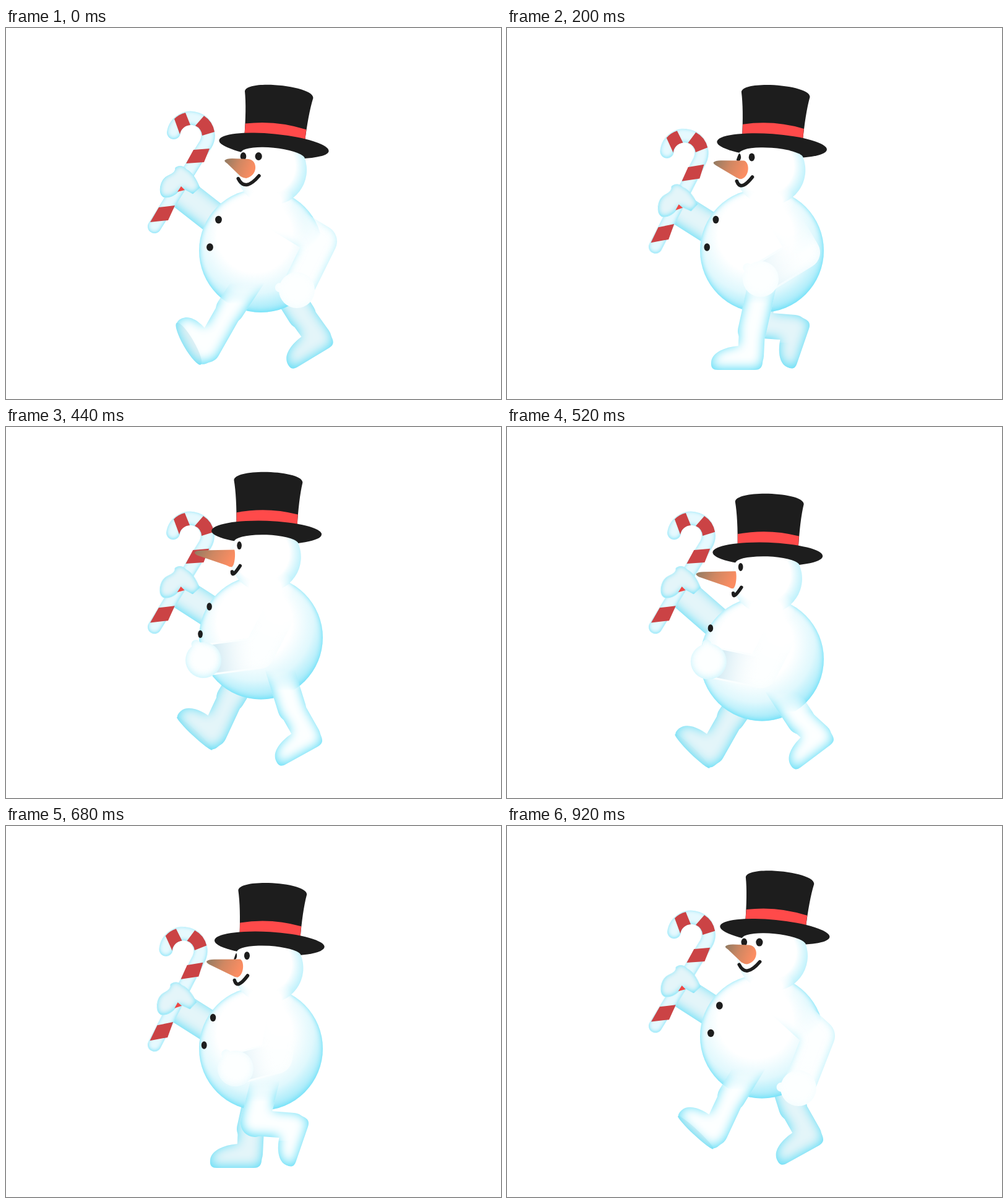
Recreate the animation shown at these times as an HTML page. Size 800 by 600 pixels, loop 960 ms.

```html
<!DOCTYPE html>
<html lang="en">
<head>
<meta charset="utf-8">
<title>Walking snowman</title>
<style>
html, body { margin: 0; width: 100%; height: 100%; overflow: hidden; background: #fff; }
svg { display: block; width: 800px; height: 600px; }
.limb { fill: none; stroke-linecap: round; stroke-linejoin: round; }
.near { stroke: #fdffff; fill: #fdffff; }
.far { stroke: #e4f5f9; fill: #e4f5f9; }
.foot, .sole { stroke: none; }
.sole { fill: #e0f1f5; }
.red { fill: #cb4345; }
.ink { fill: #1d1d1d; }
</style>
</head>
<body>
<svg viewBox="0 0 800 600">
  <defs>
    <g id="filters"></g>
    <radialGradient id="snow" gradientUnits="userSpaceOnUse" cx="402" cy="335" r="126">
      <stop offset=".48" stop-color="#fff"/>
      <stop offset=".75" stop-color="#e0f8fd"/>
      <stop offset="1" stop-color="#9ce9fa"/>
    </radialGradient>
    <radialGradient id="headSnow" gradientUnits="userSpaceOnUse" cx="-7" cy="34" r="70">
      <stop offset=".64" stop-color="#fff"/>
      <stop offset="1" stop-color="#b0eefb"/>
    </radialGradient>
    <radialGradient id="neckSnow">
      <stop offset=".55" stop-color="#fff"/>
      <stop offset="1" stop-color="#fff" stop-opacity="0"/>
    </radialGradient>
    <linearGradient id="carrot" x2="1" y2=".25">
      <stop offset="0" stop-color="#8f7a62"/>
      <stop offset=".5" stop-color="#d08762"/>
      <stop offset="1" stop-color="#fb8d62"/>
    </linearGradient>
    <linearGradient id="sleeve" gradientUnits="userSpaceOnUse">
      <stop offset=".25" stop-color="#d6ecf4"/>
      <stop offset="1" stop-color="#fff" stop-opacity="0"/>
    </linearGradient>
    <linearGradient id="legFade" gradientUnits="userSpaceOnUse" x1="0" y1="412" x2="0" y2="446">
      <stop offset="0" stop-color="#000"/>
      <stop offset="1" stop-color="#fff"/>
    </linearGradient>
    <radialGradient id="armFade" gradientUnits="userSpaceOnUse" cx="446" cy="300" r="72">
      <stop offset=".4" stop-color="#000"/>
      <stop offset="1" stop-color="#fff"/>
    </radialGradient>
    <mask id="legMask" maskUnits="userSpaceOnUse" x="200" y="0" width="400" height="600">
      <rect class="bob" x="200" y="-60" width="400" height="720" fill="url(#legFade)"/>
    </mask>
    <mask id="armMask" maskUnits="userSpaceOnUse" x="200" y="0" width="400" height="600">
      <rect class="bob" x="200" y="-60" width="400" height="720" fill="url(#armFade)"/>
    </mask>
    <path id="skull" d="M-51,14A52,13 0 0 1 51,14A57,57 0 1 1 -51,14Z"/>
    <clipPath id="faceClip"><use class="tilt" href="#skull"/></clipPath>
  </defs>

  <g filter="url(#glow)"><path id="farArm" class="limb far" style="fill:none" stroke-width="51"/></g>

  <g id="cane">
    <g filter="url(#tube)">
      <path class="limb" stroke="#e6f9fe" stroke-width="22" d="M240,321L322.8,187.8A28,28 0 1 0 271,169"/>
    </g>
    <path class="red" d="M247,290L273,287L262,311L233,314Z"/>
    <path class="red" d="M303,197L329,195L320,217L291,219Z"/>
    <path class="red" d="M320,142A38,38 0 0 1 337,168L317,174A18,18 0 0 0 306,158Z"/>
    <path class="red" d="M272,147A38,38 0 0 1 290,137L298,157A18,18 0 0 0 281,172Z"/>
    <g filter="url(#rim)">
      <path class="far" stroke="none" d="M274,226C281,221 288,224 292,229C302,234 308,246 313,258L302,268L284,258C276,270 264,276 254,273C246,268 249,249 257,242C263,237 274,236 274,226Z"/>
    </g>
    <path fill="#ee4744" d="M283,256L289,262L277,265Z"/>
  </g>

  <g id="farLeg" class="far" filter="url(#glow)"></g>

  <g class="bob">
    <circle cx="412" cy="360" r="100" fill="url(#snow)" filter="url(#rim)"/>
    <ellipse id="button1" class="ink" cy="310" ry="6.2"/>
    <ellipse id="button2" class="ink" cy="354.5" ry="6.2"/>
  </g>

  <g mask="url(#legMask)"><g id="nearLeg" class="near" filter="url(#glow)"></g></g>

  <g mask="url(#armMask)">
    <g filter="url(#armGlow)"><path id="arm" class="limb near" style="fill:none" stroke-width="52"/></g>
    <path id="forearm" class="limb" stroke="url(#sleeve)" stroke-width="46" style="stroke-linecap:butt"/>
  </g>
  <g class="near" filter="url(#handGlow)">
    <circle id="hand" r="29" stroke="none"/>
    <path id="thumb" class="limb" stroke-width="15"/>
  </g>

  <g class="bob">
    <g class="tilt">
      <path class="ink" d="M-55.5,-83C-55,-103 55,-103 55.5,-83Q50,-56 49,-8L-49,-8Q-50,-56 -55.5,-83Z"/>
      <path fill="#ff4a4a" d="M-49.5,-31Q0,-42 49.5,-31L49,-10L-49,-10Z"/>
      <ellipse class="ink" rx="89" ry="19"/>
      <use href="#skull" fill="url(#headSnow)"/>
    </g>
    <ellipse cx="419" cy="280" rx="47" ry="34" fill="url(#neckSnow)"/>
    <g clip-path="url(#faceClip)">
      <ellipse id="eye1" class="ink" ry="6.5"/>
      <ellipse id="eye2" class="ink" ry="6.5"/>
    </g>
    <path id="mouth" class="limb" stroke="#1d1d1d" stroke-width="5.5"/>
    <path id="nose" fill="url(#carrot)"/>
  </g>
</svg>
<script>
const LOOP = 960, HALF = 480, STEP = 40;
const $ = id => document.getElementById(id);
const set = (el, attrs) => { for (const k in attrs) el.setAttribute(k, attrs[k]); };

// Inner glow: colour seeps in from the edge of the shape
const innerGlow = (id, blur, dy, color) => `
  <filter id="${id}" filterUnits="userSpaceOnUse" x="-100" y="-60" width="700" height="660" color-interpolation-filters="sRGB">
    <feGaussianBlur in="SourceAlpha" stdDeviation="${blur}"/>
    <feOffset dy="${dy}" result="core"/>
    <feFlood id="${id}Flood" flood-color="${color}"/>
    <feComposite in2="core" operator="out"/>
    <feComposite in2="SourceAlpha" operator="in" result="edge"/>
    <feMerge><feMergeNode in="SourceGraphic"/><feMergeNode in="edge"/></feMerge>
  </filter>`;
$('filters').innerHTML =
  innerGlow('glow', 9, -2, '#4fdaf6') +
  innerGlow('tube', 3, -1, '#74e0f7') +
  innerGlow('rim', 4, -1, '#62dff8') +
  innerGlow('armGlow', 7, -2, '#7fe3f8') +
  innerGlow('handGlow', 6, -2, '#6fe0f8');

// Periodic monotone curve through rows of [time, values...]
function curve(rows, period) {
  const n = rows.length;
  const row = i => {
    const k = Math.floor(i / n), r = rows[i - k * n];
    return [r[0] + k * period, ...r.slice(1)];
  };
  const slope = (i, c) => {
    const a = row(i), b = row(i + 1);
    return (b[c] - a[c]) / (b[0] - a[0]);
  };
  const tangent = (i, c) => {
    const p = slope(i - 1, c), q = slope(i, c);
    return p * q <= 0 ? 0 : 2 * p * q / (p + q);
  };
  return time => {
    const t = time % period;
    let i = n - 1;
    while (rows[i][0] > t) i--;
    const a = row(i), b = row(i + 1), h = b[0] - a[0], u = (t - a[0]) / h;
    return a.slice(1).map((v, j) => {
      const c = j + 1, w = 1 - u;
      return v * w * w * (1 + 2 * u) + b[c] * u * u * (3 - 2 * u)
        + h * u * w * (w * tangent(i, c) - u * tangent(i + 1, c));
    });
  };
}

const bobAt = curve([[0, 0], [100, 29], [120, 27], [200, 0], [320, -40], [355, -43.5], [440, -19.5]], HALF);

// knee x, knee y, sole x, sole y, foot angle
const legAt = curve([
  [0, 362, 455, 306, 531, 60],
  [120, 362, 490, 357, 552, 0],
  [200, 396, 490, 394, 552, 0],
  [320, 432, 460, 446, 535, -15],
  [440, 462, 455, 498, 519, -29],
  [480, 478, 464, 516, 520, -31],
  [600, 458, 489, 517, 506, -55],
  [680, 402, 480, 485, 492, -71],
  [800, 372, 431, 401, 486, -17],
  [920, 363, 438, 321, 512, 43]
], LOOP);

// elbow x, elbow y (moves with the body), hand x, hand y
const armAt = curve([
  [0, 509, 345, 470, 424],
  [200, 480, 363, 410, 406],
  [320, 432, 385, 356, 387],
  [440, 408, 385, 319, 377],
  [600, 416, 376, 341, 384],
  [800, 481, 373, 430, 409],
  [920, 504, 359, 471, 424]
], LOOP);

for (const id of ['nearLeg', 'farLeg']) {
  $(id).innerHTML = `
    <path class="limb" stroke-width="46"/><path class="limb" stroke-width="42"/>
    <g><path class="foot" d="M-18,-38C-36,-37 -62,-30 -64,-12C-65,-2 -61,1 -53,1L6,1C16,1 18,-4 19,-10C22,-24 16,-40 0,-43Z"/>
    <ellipse class="sole" cx="-23" cy="-1" rx="39"/></g>`;
}

function drawLeg(leg, t, bob) {
  const [kx, ky, sx, sy, deg] = legAt(t);
  const a = deg * Math.PI / 180;
  const hx = 418 - 22 * Math.cos(2 * Math.PI * (t + 20) / LOOP), hy = 403 + bob;
  const [thigh, shin, foot] = leg.children;
  set(thigh, { d: `M${hx},${hy}L${kx},${ky}` });
  set(shin, { d: `M${kx},${ky}L${sx + 22 * Math.sin(a)},${sy - 22 * Math.cos(a)}` });
  set(foot, { transform: `translate(${sx},${sy}) rotate(${deg})` });
  set(foot.lastElementChild, { ry: Math.max(0, (deg - 25) / 4) });
}

function drawArm(t, bob, turn) {
  const [ex, dy, x, y] = armAt(t), ey = dy + bob;
  const a = Math.atan2(y - ey, x - ex) + 1.26;
  const front = Math.max(0, -turn);
  set($('arm'), { d: `M448,${308 + bob}L${ex},${ey}L${x},${y}` });
  set($('forearm'), { d: `M${x},${y}L${ex},${ey}`, opacity: (1 - turn) / 2 });
  set($('sleeve'), { x1: x, y1: y, x2: ex, y2: ey });
  set($('hand'), { cx: x, cy: y });
  set($('thumb'), { d: `M${x},${y}L${x + 28 * Math.cos(a)},${y + 28 * Math.sin(a)}` });
  set($('armGlowFlood'), { 'flood-opacity': .05 + .5 * Math.max(0, turn) });
  set($('handGlowFlood'), { 'flood-opacity': .08 + .35 * front });
}

function drawCane(t, bob) {
  const s = 1 - Math.cos(2 * Math.PI * t / HALF), drop = 17.5 * s;
  set($('cane'), { transform: `translate(0,${drop}) rotate(${-2.5 * s},240,321)` });
  set($('farArm'), { d: `M${287 - s},${269 + drop * .85}L370,${334 + .55 * bob + .5 * drop}` });
}

function drawFace(w) {
  const eyes = 209.3 - 1.8 * w;
  set($('eye1'), { cx: 371.5 + 12 * w, cy: eyes, rx: 4.2 + .6 * w });
  set($('eye2'), { cx: 392.5 + 15.7 * w, cy: eyes, rx: 4.7 + .9 * w });

  const lx = 370.3 + 5 * w, ly = 248.5 - 5 * w, rx = 393.5 + 15.5 * w, ry = 241.5 - 2.5 * w;
  const mx = 2 * (378.7 + 10.5 * w) - (lx + rx) / 2, my = 2 * (255 - 1.5 * w) - (ly + ry) / 2;
  set($('mouth'), { d: `M${lx},${ly}Q${mx},${my} ${rx},${ry}` });

  const nx = 329 + 24.5 * w, ny = 219 - 4 * w;
  const tx = 380.5 + 11.7 * w, ty = 215 - 3 * w;
  const bx = 376.5 + 11.7 * w, by = 244.5 - 1.5 * w;
  const edge = 389 + 18.5 * w;
  set($('nose'), {
    d: `M${nx},${ny - 1}Q${nx + 3},${ny - 4} ${nx + 12},${ny - 4}L${tx},${ty}`
      + `C${edge},${ty + 2} ${edge},${by - 4} ${bx},${by}Q${bx - 4},${by} ${bx - 9},${by - 3}`
      + `L${nx + 4},${ny + 4}Q${nx - 1},${ny + 1} ${nx},${ny - 1}Z`
  });
}

const bobbing = document.querySelectorAll('.bob'), tilting = document.querySelectorAll('.tilt');

function draw(t) {
  const [bob] = bobAt(t);
  const turn = Math.cos(2 * Math.PI * (t + 10) / LOOP);
  bobbing.forEach(el => set(el, { transform: `translate(0,${bob})` }));
  tilting.forEach(el => set(el, { transform: `translate(${427 + 6 * turn},190.3) rotate(${3.8 + 1.9 * turn})` }));
  set($('button1'), { cx: 336 + 7.5 * turn, rx: 4.8 + .6 * turn });
  set($('button2'), { cx: 321.7 + 7.8 * turn, rx: 4.6 + .8 * turn });
  drawCane(t, bob);
  drawLeg($('farLeg'), t + HALF, bob);
  drawLeg($('nearLeg'), t, bob);
  drawArm(t, bob, turn);
  drawFace(turn);
}

let last = -1;
function tick() {
  const t = Math.floor(performance.now() / STEP) * STEP % LOOP;
  if (t !== last) draw(last = t);
  requestAnimationFrame(tick);
}
draw(0);
requestAnimationFrame(tick);
</script>
</body>
</html>
```
